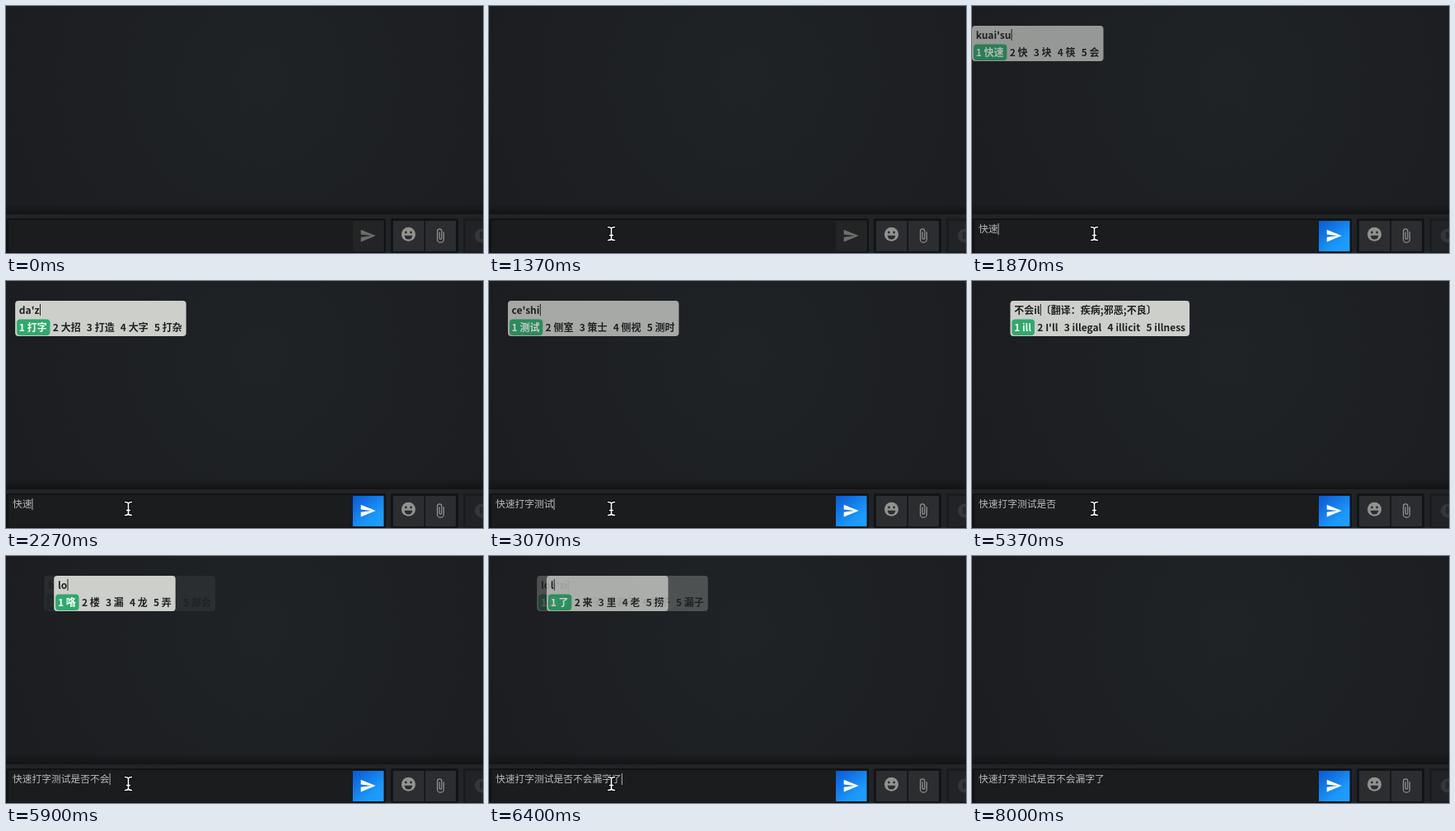
An HTML page with a canvas for the animation above (8060 ms loop, 579 by 300 pixels).

```html
<!DOCTYPE html>
<html lang="zh">
<head>
<meta charset="utf-8">
<title>拼音输入</title>
<style>
html, body { margin: 0; width: 100%; height: 100%; overflow: hidden; background: #1d2023; }
canvas { display: block; }
</style>
</head>
<body>
<canvas id="stage" width="579" height="300"></canvas>
<script>
const LOOP = 8060, FADE = 360, BLINK = 530, FOCUS = 840;
const FAMILY = '"Noto Sans CJK SC", "Noto Sans CJK", "Noto Sans", sans-serif';
const POPUP_FONT = `700 12px ${FAMILY}`;
const INPUT_FONT = `500 11.76px ${FAMILY}`;
const CHAR = 11.76;

// Each word: text, commit time, then [time, typed letters, candidates, note].
const words = [
  ['快速', 1810, [
    [1400, 'k', '看 可 快 开 课'], [1460, 'ku', '苦 哭 库 酷 裤'],
    [1520, 'kua', '夸 跨 垮 挎 胯'], [1580, 'kuai', '快 块 筷 会 侩'],
    [1650, "kuai's", '快速 快手 快使 快送 快死'], [1720, "kuai'su", '快速 快 块 筷 会']]],
  ['打字', 2430, [
    [2000, 'd', '的 到 大 都 对'], [2110, 'da', '大 打 达 答 搭'],
    [2220, "da'z", '打字 大招 打造 大字 打杂'], [2330, "da'zi", '打字 大字 搭子 达子 大子']]],
  ['测试', 3030, [
    [2560, 'c', '从 次 才 吃 出'], [2650, 'ce', '测 册 策 侧 厕'],
    [2750, "ce's", '测试 测速 测算 侧身 策士'], [2840, "ce'sh", '测试 侧身 策士 侧室 测时'],
    [2920, "ce'shi", '测试 侧室 策士 侧视 测时']]],
  ['是否', 3770, [
    [3140, 's', '是 上 所 说 时'], [3240, 'sh', '是 上 说 时 谁'],
    [3340, 'shi', '是 时 事 使 式'], [3440, "shi'f", '是否 释放 示范 师傅 十分'],
    [3540, "shi'fo", '是否 石佛 十佛 是 时'], [3640, "shi'fou", '是否 时否 是 时 事']]],
  ['不会', 5640, [
    [3890, 'b', '不 把 被 本 比', '表情：'], [3980, 'bu', '不 补 布 部 步', '表情：'],
    [4120, "bu'h", '不会 不好 不和 不含 不换'], [4220, "bu'hu", '不会 不胡 补护 不呼 部户'],
    [4320, "bu'hui", '不会 不回 不悔 不毁 部会'],
    [4640, "bu'hui'l", '不会了 不会 不回 不悔 不毁'], [4770, "bu'huil", '不会 不回 不悔 不毁 部会'],
    [4900, "bu'hui'l", '不会了 不会 不回 不悔 不毁'],
    [5210, '不会il', "ill I'll illegal illicit illness", '翻译：疾病;邪恶;不良'],
    [5460, '不会i', 'I in is it if'], [5550, "bu'hui", '不会 不回 不悔 不毁 部会']]],
  ['漏字', 6230, [
    [5740, 'l', '了 来 里 老 捞'], [5830, 'lo', '咯 楼 漏 龙 弄'],
    [5930, 'lou', '楼 漏 露 搂 娄'], [6040, "lou'z", '漏字 楼主 楼中 漏嘴 漏子'],
    [6140, "lou'zi", '漏字 楼子 篓子 娄子 漏子']]],
  ['了', 6350, [[6280, 'l', '了 来 里 老 捞']]]
].map(([text, commit, keys]) => ({ text, commit, keys }));
words.reduce((offset, word) => { word.offset = offset; return offset + word.text.length; }, 0);

const SEND = new Path2D('M2 21L23 12 2 3V10l15 2-15 2z');
const CLIP = new Path2D('M16.5 6v11.5a4 4 0 0 1-8 0V5a2.5 2.5 0 0 1 5 0v10.5a1 1 0 0 1-2 0V6H10v9.5a2.5 2.5 0 0 0 5 0V5a4 4 0 0 0-8 0v12.5a5.5 5.5 0 0 0 11 0V6z');
const ARROW = new Path2D('M0 0V15L3.5 11.8 6 17.2 8.3 16.2 5.9 11H10.7z');
const IBEAM = new Path2D('M-4 -8Q-1 -8 0 -6.5Q1 -8 4 -8M0 -6.5V6.5M-4 8Q-1 8 0 6.5Q1 8 4 8M-2 2H2');

const stage = document.getElementById('stage');
const screen = stage.getContext('2d');
const layerCanvas = document.createElement('canvas');
layerCanvas.width = 579;
layerCanvas.height = 300;
const layer = layerCanvas.getContext('2d');

function box(c, x, y, w, h, fill, radius = 0) {
  c.fillStyle = fill;
  c.beginPath();
  c.roundRect(x, y, w, h, radius);
  c.fill();
}

function dot(c, x, y, r, fill, from = 0, to = 2 * Math.PI) {
  c.fillStyle = fill;
  c.beginPath();
  c.arc(x, y, r, from, to);
  c.fill();
}

function icon(path, x, y, sx, sy, fill) {
  screen.save();
  screen.translate(x, y);
  screen.scale(sx, sy);
  screen.fillStyle = fill;
  screen.fill(path);
  screen.restore();
}

function label(c, text, x, y, color) {
  c.fillStyle = color;
  c.fillText(text, x, y);
  return x + c.measureText(text).width;
}

function drawRoom(active) {
  const c = screen;
  const glow = c.createRadialGradient(310, 90, 0, 310, 90, 330);
  glow.addColorStop(0, '#1f2326');
  glow.addColorStop(1, '#1c1d21');
  box(c, 0, 0, 579, 300, glow);
  const shade = c.createLinearGradient(0, 240, 0, 253);
  shade.addColorStop(0, '#12131400');
  shade.addColorStop(1, '#121314');
  box(c, 0, 240, 579, 13, shade);
  box(c, 0, 253, 579, 47, '#212427');

  box(c, 0, 258, 461, 42, '#111213', 2);
  box(c, 3, 260, 456, 39, '#1b1c1d');
  let button = '#222426';
  if (active) {
    button = c.createLinearGradient(421, 261, 452, 298);
    button.addColorStop(0, '#0b58d2');
    button.addColorStop(.75, '#1b98fb');
    button.addColorStop(1, '#1f9dff');
  }
  box(c, 421, 261, 37.5, 37, button);
  icon(SEND, 429, 269.2, .86, .82, active ? '#fff' : '#6d6d69');

  box(c, 467, 258, 82, 42, '#121315', 2);
  box(c, 470, 261, 37.5, 37, '#2b2d31');
  box(c, 509, 261, 37, 37, '#2b2d31');
  dot(c, 488.5, 277.3, 8.5, '#92928f');
  dot(c, 485.4, 275, 1.4, '#2b2d31');
  dot(c, 491.6, 275, 1.4, '#2b2d31');
  dot(c, 488.5, 278.8, 4.8, '#2b2d31', 0, Math.PI);
  icon(CLIP, 517.2, 269.4, .82, .8, '#92928f');

  box(c, 555, 258, 24, 42, '#191b1d', 2);
  box(c, 558, 261, 21, 37, '#212326');
  dot(c, 577.5, 279, 8.5, '#34373a');
  box(c, 575, 274, 4, 9, '#25282b', 2);
}

function drawGesture(c, x, y) {
  dot(c, x, y - 2, 4.5, '#342d2a');
  dot(c, x, y - 1, 3.6, '#e5c3a5');
  box(c, x - 6, y + 2, 12, 4.5, '#55977c', 2);
  c.strokeStyle = '#e5c3a5';
  c.lineWidth = 1.5;
  c.stroke(new Path2D(`M${x - 4} ${y + 1}L${x + 3} ${y + 5}M${x + 4} ${y + 1}L${x - 3} ${y + 5}`));
}

function drawPopup(word, [, typed, list, note], alpha) {
  const c = layer, ink = '#202322';
  const left = Math.max(0, -.6 + word.offset * CHAR / 2);
  const start = left + 4.7;
  c.clearRect(0, 0, 579, 300);
  c.font = POPUP_FONT;

  const caret = label(c, typed, start, 39.5, ink) + .3;
  box(c, caret, 28, 1, 14, ink);
  let right = caret;
  if (note) {
    right = label(c, '〔' + note, caret + 1, 39.5, ink);
    if (note === '表情：') {
      drawGesture(c, right + 7, 35);
      right += 14;
    }
    right = label(c, '〕', right, 39.5, ink);
  }

  let x = start;
  list.split(' ').forEach((candidate, i) => {
    const text = `${i + 1} ${candidate}`;
    const width = c.measureText(text).width;
    if (!i) box(c, left + 2, 46.5, width + 6.5, 19.5, '#31a96c', 4);
    label(c, text, x, 60.5, i ? ink : '#f3fff8');
    right = Math.max(right, x + width);
    x += width + 7.2;
  });

  c.globalCompositeOperation = 'destination-over';
  box(c, left, 24, right + 5 - left, 43, '#cdcfcb', 4);
  c.globalCompositeOperation = 'source-over';
  screen.globalAlpha = alpha;
  screen.drawImage(layerCanvas, 0, 0);
  screen.globalAlpha = 1;
}

function drawPointer(time) {
  const clamp = v => Math.min(1, Math.max(0, v));
  const enter = 1 - (1 - clamp((time - 400) / 430)) ** 2;
  const leave = clamp((time - 7070) / 400) ** 2;
  if (!enter || leave === 1) return;
  const x = 148.5 + 52 * (1 - enter) + 40 * leave;
  const y = 276.5 - 294 * (1 - enter) - 296 * leave;
  const c = screen;
  c.save();
  c.translate(x, y);
  c.lineJoin = c.lineCap = 'round';
  if (y < 256) {
    c.strokeStyle = '#000';
    c.lineWidth = 2;
    c.stroke(ARROW);
    c.fillStyle = '#fff';
    c.fill(ARROW);
  } else {
    for (const [color, width] of [['#000', 3.6], ['#fff', 1.6]]) {
      c.strokeStyle = color;
      c.lineWidth = width;
      c.stroke(IBEAM);
    }
  }
  c.restore();
}

function draw(time) {
  const done = words.filter(word => word.commit <= time);
  const text = done.map(word => word.text).join('');
  drawRoom(text.length > 0);

  screen.font = INPUT_FONT;
  label(screen, text, 8, 275, '#b8bab9');
  const since = time - (done.length ? done[done.length - 1].commit : FOCUS);
  if (since >= 0 && Math.floor(since / BLINK) % 2 === 0) {
    box(screen, 8 + text.length * CHAR, 264, 1, 14, '#a9b7c0');
  }

  for (const word of words) {
    const key = word.keys.filter(([at]) => at <= time).pop();
    const fade = Math.max(0, time - word.commit) / FADE;
    if (key && fade < 1) drawPopup(word, key, (1 - fade) ** 2);
  }
  drawPointer(time);
}

const begin = performance.now();
function tick() {
  draw((performance.now() - begin) % LOOP);
  requestAnimationFrame(tick);
}
tick();
</script>
</body>
</html>
```
